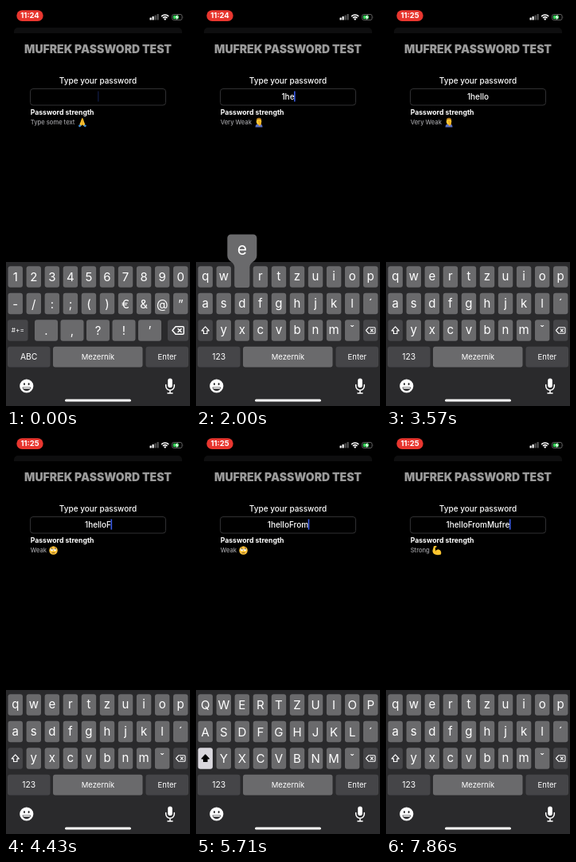
Animation, 231 px wide and 500 px high, one loop 8000 ms. Source, as an HTML page:

```html
<!DOCTYPE html>
<html lang="en">
<head>
<meta charset="utf-8">
<title>Password strength</title>
<style>
html, body { margin: 0; width: 100%; height: 100%; overflow: hidden; background: #000; }
svg { display: block; width: 231px; height: 500px; font-family: Inter, Roboto, "Liberation Sans", sans-serif; fill: #fff; }
.mid { text-anchor: middle; }
.key { fill: #6a6a6c; }
.fn { fill: #454548; }
.line { fill: none; stroke: #fff; stroke-width: 1.2; stroke-linejoin: round; stroke-linecap: round; }
.thick { stroke-width: 1.5; }
</style>
</head>
<body>
<svg id="stage" viewBox="0 0 231 500" xmlns="http://www.w3.org/2000/svg">
  <rect width="231" height="500" fill="#000"/>

  <!-- status bar -->
  <rect x="13.3" y="5.3" width="33.4" height="13.6" rx="6.8" fill="#e8362f"/>
  <text id="clock" class="mid" x="30" y="15.4" font-size="9.4" font-weight="700">11:24</text>
  <rect x="180.5" y="14.5" width="2.2" height="3" rx=".6"/>
  <rect x="183.5" y="13" width="2.2" height="4.5" rx=".6"/>
  <rect x="186.5" y="11.5" width="2.2" height="6" rx=".6" fill="#555"/>
  <rect x="189.5" y="10" width="2.2" height="7.5" rx=".6" fill="#555"/>
  <path class="line thick" d="M195.6 12.6a6 6 0 0 1 8.2 0M197.4 14.6a3.6 3.6 0 0 1 4.6 0"/>
  <circle cx="199.7" cy="16.4" r="1.2"/>
  <rect x="208.5" y="10.5" width="12.5" height="7" rx="2" fill="none" stroke="#777" stroke-width=".8"/>
  <rect x="209.8" y="11.8" width="7" height="4.4" rx="1" fill="#35d158"/>
  <path d="M221.8 12.7q1.1 1.3 0 2.6z" fill="#777"/>
  <path d="M215.6 10.6l-3.2 4h2l-.7 3 3.2-4h-2z"/>

  <!-- sheet edges -->
  <path d="M10 35v-3a5 5 0 0 1 5-5h201a5 5 0 0 1 5 5v3z" fill="#0e0e0f"/>
  <path d="M0 42v-2a6 6 0 0 1 6-6h219a6 6 0 0 1 6 6v2z" fill="#000"/>

  <!-- form -->
  <text class="mid" x="115.5" y="59.3" font-size="14" font-weight="900" fill="#9a9a9a">MUFREK PASSWORD TEST</text>
  <text class="mid" x="115.5" y="97.4" font-size="10" font-weight="500">Type your password</text>
  <rect x="30.5" y="103.5" width="170" height="20.5" rx="3.5" fill="#000" stroke="#303032"/>
  <text id="entry" class="mid" x="115.5" y="117.2" font-size="10" font-weight="500"></text>
  <rect id="caret" y="106.5" width="1.6" height="13" fill="#3a5be6"/>
  <text x="30.7" y="135.6" font-size="8.7" font-weight="700">Password strength</text>
  <text id="level" x="30.7" y="148.3" font-size="7.6" font-weight="500" fill="#a0a0a4"></text>
  <g id="icons"></g>

  <!-- keyboard -->
  <rect y="320" width="231" height="180" fill="#2a2a2c"/>
  <g id="boards"></g>
  <rect class="fn" x="2" y="425.7" width="53.5" height="25.8" rx="3"/>
  <rect class="key" x="59" y="425.7" width="112.5" height="25.8" rx="3"/>
  <rect class="fn" x="175.5" y="425.7" width="53.5" height="25.8" rx="3"/>
  <g class="mid" font-size="9.5">
    <text id="mode" x="28.7" y="442.3" font-size="10.4"></text>
    <text x="115.5" y="441.8">Mezerník</text>
    <text x="202.3" y="441.8">Enter</text>
  </g>
  <circle cx="25.8" cy="475" r="8.6"/>
  <g fill="#2a2a2c">
    <ellipse cx="23" cy="472.5" rx="1" ry="1.5"/>
    <ellipse cx="28.6" cy="472.5" rx="1" ry="1.5"/>
    <path d="M20.6 476.4h10.4a5.2 4.7 0 0 1-10.4 0z"/>
  </g>
  <path d="M21.6 477h8.4v1.4h-8.4z"/>
  <rect x="203.2" y="465.5" width="5.6" height="11.5" rx="2.8"/>
  <path class="line thick" d="M200.7 473.5v1.5a5.3 5.3 0 0 0 10.6 0v-1.5M206 480.5v3.3M203 484h6"/>
  <rect x="74" y="491.6" width="83" height="3" rx="1.5"/>
  <g id="popup">
    <path class="key" d="M-14-39.5H14a4.5 4.5 0 0 1 4.5 4.5V-13C18.5-5 9.5-6 9.5 2V24a3 3 0 0 1-3 3H-6.5a3 3 0 0 1-3-3V2C-9.5-6-18.5-5-18.5-13V-35a4.5 4.500 0 0 1 4.5-4.5z"/>
    <text id="big" class="mid" y="-14" font-size="21"></text>
  </g>
</svg>
<script>
const LOOP = 8000, PITCH = 23.05, ROWS = [325, 358.5, 392];
const LETTERS = ["qwertzuiop", "asdfghjkl´", " yxcvbnmˇ"];
const $ = id => document.getElementById(id);

// [start ms, entry, board, pressed key]
const STEPS = [
  [0, "", "num"], [710, "1", "num"], [1290, "1", "low"],
  [1710, "1h", "low", "h"], [1860, "1h", "low"],
  [2000, "1he", "low", "e"], [2140, "1hel", "low", "l"], [2290, "1hel", "low"],
  [2430, "1hell", "low", "l"], [2570, "1hello", "low", "o"], [2710, "1hello", "low"],
  [4000, "1hello", "up"], [4140, "1helloF", "up", "f"], [4290, "1helloF", "low"],
  [4570, "1helloFr", "low", "r"], [4710, "1helloFr", "low"],
  [4860, "1helloFro", "low", "o"], [5000, "1helloFro", "low"],
  [5290, "1helloFrom", "low", "m"], [5430, "1helloFrom", "low"],
  [5570, "1helloFrom", "up"], [6000, "1helloFromM", "up", "m"], [6140, "1helloFromM", "low"],
  [6860, "1helloFromMu", "low", "u"], [7000, "1helloFromMu", "low"],
  [7290, "1helloFromMuf", "low", "f"], [7430, "1helloFromMuf", "low"],
  [7570, "1helloFromMufr", "low", "r"], [7710, "1helloFromMufre", "low", "e"],
  [7860, "1helloFromMufre", "low"]
];

// [minimum length, label, icon x, icon drawing in a 12 unit box]
const LEVELS = [
  [0, "Type some text", 90,
    `<path fill="#3f8fd8" d="M3 8.2L.6 10.4l2.2 1.5 2-2zM8.600 8.200l2.600 2-2 1.700-2.200-2z"/>
     <path fill="#f9c22e" d="M5.700.2Q4.200 2.600 3.800 5L2.400 8.200l2.200 2 1.300-1.400 1.300 1.400 2-2L7.900 5Q7.500 2.600 6 .2z"/>
     <path fill="none" stroke="#c98512" stroke-width=".5" d="M5.900 1.500v7"/>`],
  [1, "Very Weak", 73,
    `<path fill="#5a6fc0" d="M1.500 12q0-4.200 4.500-4.200t4.500 4.200z"/>
     <ellipse cx="6" cy="4.700" rx="3.200" ry="4" fill="#fbc935"/>
     <path fill="#a8741f" d="M2.800 3.500Q2.800.2 6 .2t3.200 3.300Q7.500 1.800 6 1.900 4.500 1.800 2.800 3.500z"/>
     <path fill="#f0b028" d="M4.200 3.800l4 .5.800 3.500-1.500 2.400-2-.5.300-3.200z"/>`],
  [7, "Weak", 53.5,
    `<circle cx="6" cy="6" r="5.300" fill="#fcc33a"/>
     <circle cx="4" cy="5.200" r="1.600" fill="#fff"/><circle cx="8" cy="5.200" r="1.600" fill="#fff"/>
     <circle cx="4.300" cy="4.300" r=".7" fill="#4a3020"/><circle cx="8.300" cy="4.300" r=".7" fill="#4a3020"/>
     <path fill="none" stroke="#7a4a1c" stroke-width=".8" d="M4 9h4M2.500 2.900l2-.7M7.500 2.200l2 .7"/>`],
  [11, "Good", 53,
    `<path fill="#fcc62f" d="M1 6l2.500-.8L6 1.300Q6.500-.3 7.600.6 8.500 1.800 7.300 4.600h3q1.500.3.800 1.600.8 1 0 1.800.5 1-.4 1.600.2 1.400-1.500 1.500H5L3 10.300 1 10.500z"/>
     <path fill="none" stroke="#d58d18" stroke-width=".5" d="M8 6.300h3M8 8h3M7.800 9.600h2.700"/>`],
  [14, "Strong", 58,
    `<path fill="#fcc62f" d="M2 .8l3-.5q1 .7.300 1.700l-1.500.5.300 4Q7 3.800 9.500 5.500 12 7.500 11 11 7 12.500 3.500 11 .2 9.500.5 6z"/>
     <path fill="none" stroke="#d58d18" stroke-width=".6" d="M4.100 6.500q.1 1.200 1.300 1.700"/>`]
];

const keyRect = (cx, y, w, cls, style = "") =>
  `<rect class="${cls}" style="${style}" x="${cx - w / 2}" y="${y + 0.3}" width="${w}" height="26.4" rx="3"/>`;
const keyText = (cx, y, ch, size = 15) =>
  `<text class="mid" x="${cx}" y="${y}" font-size="${size}">${ch.replace("&", "&amp;")}</text>`;
const col = i => 11.75 + i * PITCH;
const eraser = (cx, scale) =>
  `<path class="line" transform="translate(${cx} 405.5) scale(${scale})" d="M-6 0l3.5-4H5q1 0 1 1V3q0 1-1 1H-2.5zM0-1.7L3.4 1.7M3.4-1.7L0 1.7"/>`;

function keyRow(chars, y, base) {
  return [...chars].map((c, i) => c === " " ? "" :
    keyRect(col(i), y, 18.4, "key") + keyText(col(i), y + base, c)).join("");
}

function letterBoard(up) {
  const rows = LETTERS.map((r, i) => keyRow(up ? r.toUpperCase() : r, ROWS[i], up ? 19.2 : 18)).join("");
  const arrow = `<path class="line" style="${up ? "fill:#000;stroke:#000" : ""}" transform="translate(${col(0)} 405.5)" d="M0-4.600L4.600.3H2.200V4H-2.200V.3H-4.600z"/>`;
  return rows + keyRect(col(0), ROWS[2], 18.4, "fn", up ? "fill:#d9d7dd" : "") + arrow +
    keyRect(col(9), ROWS[2], 18.4, "fn") + eraser(col(9), 0.95);
}

function numberBoard() {
  const marks = [...".,?!’"].map((c, i) => {
    const cx = 50.5 + i * 32.5;
    return keyRect(cx, ROWS[2], 29, "key") + keyText(cx, ROWS[2] + 19, c);
  }).join("");
  return keyRow("1234567890", ROWS[0], 19.2) + keyRow("-/:;()€&@”", ROWS[1], 19) + marks +
    keyRect(14.8, ROWS[2], 25.5, "fn") + keyText(14.8, ROWS[2] + 16.3, "#+=", 8.2) +
    keyRect(216, ROWS[2], 26, "fn") + eraser(216, 1.2);
}

const boards = { num: numberBoard(), low: letterBoard(false), up: letterBoard(true) };
$("boards").innerHTML = Object.entries(boards)
  .map(([name, body]) => `<g id="board-${name}">${body}</g>`).join("");
$("icons").innerHTML = LEVELS
  .map(([, , x, body]) => `<g transform="translate(${x} 139.5)">${body}</g>`).join("");
const accent = [...$("board-low").querySelectorAll("text")].find(n => n.textContent === "´");
const show = (node, on) => node.setAttribute("visibility", on ? "visible" : "hidden");

function drawStep([, entry, board, key]) {
  $("entry").textContent = entry;
  const width = entry ? $("entry").getComputedTextLength() : 0;
  $("caret").setAttribute("x", 115 + width / 2);

  const level = LEVELS.filter(l => entry.length >= l[0]).length - 1;
  $("level").textContent = LEVELS[level][1];
  [...$("icons").children].forEach((n, i) => show(n, i === level));

  for (const name in boards) show($("board-" + name), name === board);
  $("mode").textContent = board === "num" ? "ABC" : "123";
  accent.textContent = entry.endsWith("u") ? "°" : "´";

  show($("popup"), key);
  if (!key) return;
  const row = LETTERS.findIndex(r => r.includes(key));
  $("popup").setAttribute("transform", `translate(${col(LETTERS[row].indexOf(key))} ${ROWS[row]})`);
  $("big").textContent = board === "up" ? key.toUpperCase() : key;
}

function caretAlpha(age) {
  const p = age % 1100;
  if (p < 600) return 1;
  if (p < 700) return (700 - p) / 100;
  return p < 1000 ? 0 : (p - 1000) / 100;
}

let current = -1;
function frame() {
  const t = performance.now() % LOOP;
  let now = 0, typed = -675;
  STEPS.forEach((s, i) => {
    if (s[0] > t) return;
    now = i;
    if (i && s[1] !== STEPS[i - 1][1]) typed = s[0];
  });
  if (now !== current) drawStep(STEPS[current = now]);
  $("caret").setAttribute("opacity", caretAlpha(t - typed));
  $("clock").textContent = t < 3000 ? "11:24" : "11:25";
  requestAnimationFrame(frame);
}
frame();
</script>
</body>
</html>
```
